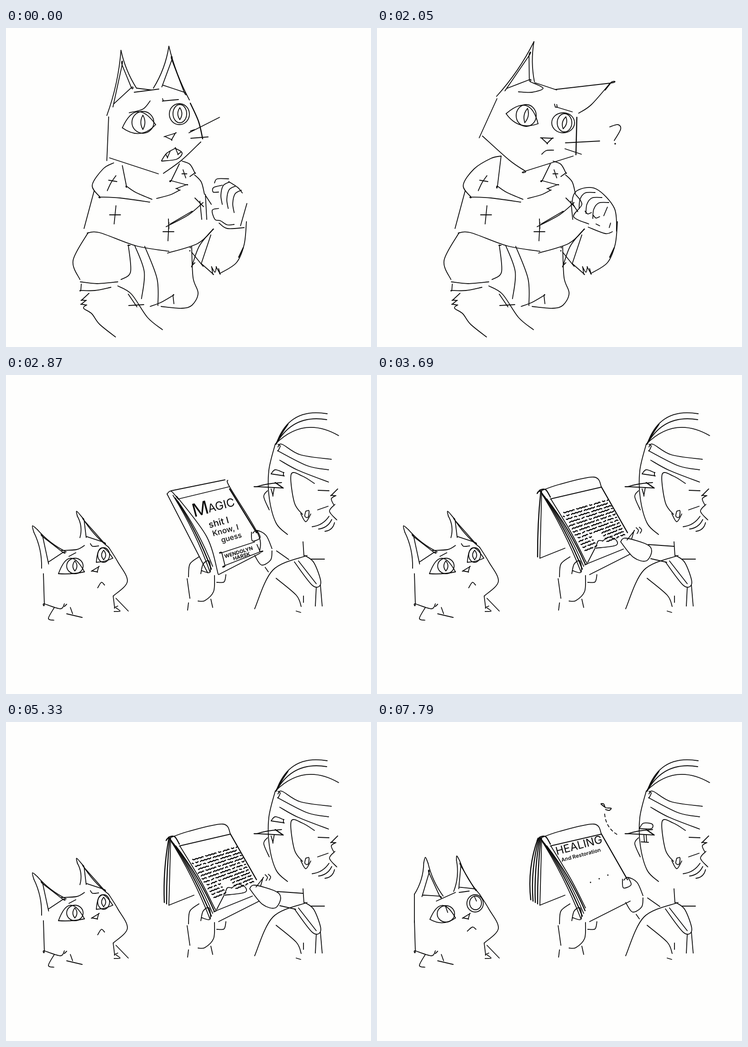
These frames come from a looping animation (800 by 700 pixels, 8000 ms). An HTML page with a canvas:

```html
<!DOCTYPE html>
<html lang="en">
<head>
<meta charset="utf-8">
<title>Cat and book</title>
<style>
html, body { margin: 0; width: 100%; height: 100%; overflow: hidden; background: #fefefd; }
canvas { display: block; width: 100%; height: 100%; }
</style>
</head>
<body>
<canvas id="stage" width="800" height="700"></canvas>
<script>
const LOOP = 8000, STEP = 410, PEN = 1.8, THICK = 2.4;
const c = document.getElementById('stage').getContext('2d');

// ---- Pen helpers ----

// Smooth curve through "x,y" points; "!" marks a sharp corner.
function trace(line) {
  const p = [];
  for (const s of line.trim().split(/\s+/)) {
    const q = s.replace('!', '').split(',').map(Number);
    p.push(q);
    if (s.endsWith('!')) p.push(q);
  }
  c.moveTo(...p[0]);
  for (let i = 0; i + 1 < p.length; i++) {
    const a = p[i], b = p[i + 1], o = p[i - 1] || a, n = p[i + 2] || b;
    c.bezierCurveTo(a[0] + (b[0] - o[0]) / 6, a[1] + (b[1] - o[1]) / 6,
      b[0] - (n[0] - a[0]) / 6, b[1] - (n[1] - a[1]) / 6, b[0], b[1]);
  }
}

function ink(lines, width = PEN, dx = 0, dy = 0) {
  c.save();
  c.translate(dx, dy);
  c.lineWidth = width;
  c.beginPath();
  lines.split('|').forEach(trace);
  c.stroke();
  c.restore();
}

// The same stroke several times, each shifted by (dx, dy).
function row(line, count, dx, dy, width) {
  for (let i = 0; i < count; i++) ink(line, width, i * dx, i * dy);
}

// Arc between two points whose middle is pushed sideways by bulge.
function bow(x1, y1, x2, y2, bulge, width = PEN) {
  const k = 2 * bulge / Math.hypot(x2 - x1, y2 - y1);
  c.lineWidth = width;
  c.beginPath();
  c.moveTo(x1, y1);
  c.quadraticCurveTo((x1 + x2) / 2 - (y2 - y1) * k, (y1 + y2) / 2 + (x2 - x1) * k, x2, y2);
  c.stroke();
}

function oval(x, y, rx, ry) {
  c.lineWidth = PEN;
  c.beginPath();
  c.ellipse(x, y, rx, ry, 0, 0, 7);
  c.stroke();
}

function dot(x, y, r = 1.4) {
  c.beginPath();
  c.arc(x, y, r, 0, 7);
  c.fill();
}

function cross(x, y, lean, size) {
  ink(`${x + lean},${y - size} ${x - lean},${y + size}|${x - size * .6},${y} ${x + size * .6},${y}`);
}

function write(text, x, y, size, weight = 400, angle = -15) {
  c.save();
  c.translate(x, y);
  c.rotate(angle * Math.PI / 180);
  c.font = `${weight} ${size}px Inter, sans-serif`;
  c.fillText(text, 0, 0);
  c.restore();
}

// ---- Cat parts ----

// Outer ear from base over the tip, plus a shrunken inner triangle moved by (dx, dy).
function ear(base, tip, end, dx = 0, dy = 0, round = 0) {
  const mid = i => (base[i] + tip[i] + end[i]) / 3;
  const inner = p => [mid(0) + (p[0] - mid(0)) * .6 + dx, mid(1) + (p[1] - mid(1)) * .6 + dy];
  const near = (p, f) => [tip[0] + (p[0] - tip[0]) * f, tip[1] + (p[1] - tip[1]) * f];
  const [l, r] = [near(base, round), near(end, round)];
  bow(...base, ...l, 5);
  bow(...r, ...end, 4);
  if (round) ink(`${l} ${tip} ${r}`);
  ink(`${inner(base)}! ${inner(tip)}! ${inner(end)}! ${inner(base)}`);
}

function almond(x1, y1, x2, y2, up, down) {
  bow(x1, y1, x2, y2, -up);
  bow(x1, y1, x2, y2, down);
}

function iris(x, y, rx, ry, lean = 0) {
  oval(x, y, rx, ry);
  const tall = ry * .65;
  for (const side of [-1, 1]) bow(x + lean, y - tall, x - lean, y + tall, side * 4.5);
}

// ---- Close-up ----

function clothes(tilted) {
  ink(`${tilted ? '272,281 250,286' : '236,296'} 213,309 189,345 206,371! 250,373 315,382`);
  ink(`${tilted ? '272,281' : '255,302'} 264,347! 285,361 320,376|330,374 360,366 380,356! 374,352! 395,344! 362,335! 380,298`);
  ink('386,292 403,299 414,318! 403,326|193,358 171,440');
  ink('413,322 428,338 435,365|178,450 205,449 285,478 357,490|354,494 420,473 455,441');
  if (!tilted) ink('437,365 440,420|437,367 450,387');
  ink('241,324 230,340 222,357|225,334 243,337');
  cross(391, 320, -3, 9);
  cross(239, 410, 2, 20);
  cross(356, 447, 1, 20);
  ink('356,419 357,440|351,436 400,410 432,383|360,430 408,402|414,373 433,392|425,380 429,420');
}

function body() {
  ink('180,449 147,510 162,552|268,476 273,535 252,552|163,557 200,561 245,557|165,562 164,576! 195,576 230,569');
  ink('182,582 166,597! 175,598! 165,606! 176,608! 170,615 188,627 205,650 240,678|245,566 275,584 310,635 343,662');
  ink('269,609 302,607|268,584 287,612|272,477 267,477|282,477 303,535 297,594|304,479 331,550 333,609');
  ink('316,611 340,602 366,587! 368,605|340,611 385,615 408,608 421,582 410,548 407,480');
  ink('454,441 424,478 408,521! 414,515|449,454 428,517|407,492 432,523');
  ink('428,517 453,539! 451,525! 458,536 461,525! 469,539! 466,528|468,539 505,515 522,475 527,425');
  ink('510,503 520,482', THICK);
  dot(404, 482);
  dot(403, 489);
}

function openHand(dx, dy) {
  row('490,338 476,346 471,367 474,387', 3, 13, 9);
  ink('457,340 463,331 488,331|466,360 454,360 455,350 474,345|488,337 508,350 518,362', PEN, dx, dy);
  ink('466,396 452,400 458,420 470,423 485,432 500,431|528,385 514,434|467,428 485,440 522,438', PEN, dx, dy);
}

function fist(dx, dy) {
  row('443,396 445,376 456,362 478,361', 3, 15, 11);
  row('470,405 462,408 456,402', 2, 18, 9);
  ink('440,403 428,380 440,356 480,353 520,395 525,446|436,366 449,387 431,414 464,430', PEN, dx, dy);
  ink('505,393 497,412|463,437 500,451 516,447|480,430 488,434|509,438 512,428', PEN, dx, dy);
}

const wideMouth = '341,291 352,275 371,264! 386,274 374,288 341,292|350,277 354,284! 360,270|372,265 377,277! 384,272';

function headUp() {
  ear([221, 192], [252, 49], [286, 132], 2, 2);
  ear([323, 132], [357, 40], [402, 158], 5, 2);
  ink('281,141 335,134|286,132 318,136|225,195 221,291|227,285 334,320|345,319 385,290 427,250');
  ink('401,230 468,196|405,242 443,239|404,226 413,223|270,186 300,178 316,160|343,155 345,160! 378,157');
  ink('404,165 422,205 431,243', THICK);
  almond(255, 219, 328, 212, 32, 16);
  iris(300, 207, 24, 24);
  oval(380, 189, 22, 23);
  iris(381, 188, 15, 20);
  ink('348,238! 371,231! 363,245! 348,238');
}

function headTilt() {
  ear([262, 150], [344, 30], [345, 118], 0, 3);
  ink('310,140 340,141 364,132 336,118|346,120 394,136|390,135 511,121! 470,168 442,187');
  ink('263,155 224,241|231,237 290,290 325,314! 430,281|389,167 391,174|394,168 395,174! 428,184');
  ink('413,252 488,248|412,265 448,277|360,241! 384,242! 373,253! 360,241');
  ink('438,196 436,278|511,122 500,136', THICK);
  almond(283, 188, 353, 210, 30, 14);
  iris(327, 192, 22, 24, 3);
  oval(408, 208, 25, 22);
  iris(411, 208, 16, 20, 3);
}

function closeUp(step) {
  const tilted = step > 2;
  clothes(tilted);
  body();
  if (tilted) {
    headTilt();
    fist(step === 4 ? -3 : 0, 0);
    if (step === 3) ink(wideMouth, PEN, 5, 4);
    if (step === 4) ink('353,282 365,271 385,270 380,281 353,282');
    if (step === 5) ink('361,277 371,269 387,268');
    if (step > 3) {
      ink('510,217 528,212 534,222 520,247');
      dot(522, 254, 1.8);
    }
  } else {
    headUp();
    openHand([0, -6, 10][step], 0);
    ink(step === 1 ? '350,286 373,276 382,278' : wideMouth);
  }
}

// ---- Streaked wipe ----

// Tapered brush band: starts at x around y, ends on the right between top and bottom.
function band(x, y, thick, top, bottom, reach, tone) {
  const w = 800 - x, g = c.createLinearGradient(x, 0, x + reach, 0);
  g.addColorStop(0, 'rgba(244,234,230,0)');
  g.addColorStop(.3, `rgba(${tone + 75},${tone + 66},${tone + 62},.7)`);
  g.addColorStop(1, `rgb(${tone},${tone - 1},${tone - 2})`);
  c.fillStyle = g;
  c.beginPath();
  c.moveTo(x, y - thick / 2);
  c.bezierCurveTo(x + w * .25, y - thick / 2, x + w * .4, top, 800, top);
  c.lineTo(800, bottom);
  c.bezierCurveTo(x + w * .4, bottom, x + w * .25, y + thick / 2, x, y + thick / 2);
  c.fill();
}

function wipe() {
  band(430, 20, 44, 0, 38, 370, 200);
  band(500, 91, 58, 66, 113, 700, 225);
  band(470, 173, 46, 146, 194, 350, 203);
  band(480, 348, 88, 303, 382, 400, 208);
  band(470, 520, 44, 492, 540, 360, 168);
  band(245, 61, 18, 36, 66, 470, 155);
  band(245, 143, 27, 113, 146, 510, 160);
  band(200, 265, 58, 222, 296, 460, 143);
  band(130, 230, 17, 192, 222, 400, 134);
  band(130, 315, 27, 289, 303, 470, 134);
  band(325, 452, 102, 386, 492, 415, 133);
  band(195, 403, 2, 382, 400, 480, 133);
  band(230, 499, 11, 484, 492, 450, 133);
  band(280, 571, 54, 540, 592, 440, 142);
  band(205, 662, 76, 590, 700, 190, 132);
  band(125, 613, 20, 592, 620, 290, 132);
}

// ---- Reading scene ----

function paws() {
  ink('82,436 84,502! 119,513 128,502|128,508 133,503|106,510 93,534 105,538|141,510 146,524|133,524 167,532');
  ink('235,486 238,510! 245,507|241,490 268,518|237,519 250,518 241,511');
  ink('188,430! 203,421! 200,432! 188,430|225,378 245,410 266,453 235,485');
}

function cat(mood) {
  paws();
  const alert = mood === 'alert';
  if (alert) {
    ear([82, 378], [106, 297], [145, 382], 6, 12, .15);
    ear([168, 372], [175, 294], [225, 378], 3, 0, .12);
    ink('82,440 82,378|130,393 172,374|180,374 202,371|198,459 209,450 217,455');
    almond(116, 433, 172, 430, 29, 9);
    oval(151, 421, 19, 18);
    oval(215, 398, 18, 19);
    oval(216, 397, 13, 15);
    ink('150,404 155,418|214,384 218,393');
    return;
  }
  const bored = mood === 'bored';
  ear([162, 357], [155, 299], [225, 378], 6, 2, .18);
  if (bored) ear([82, 435], [26, 356], [118, 382], 12, 2, .15);
  else ear([78, 424], [58, 331], [132, 388], 10, 4, .15);
  ink('122,385 155,383 172,374|138,398 153,390|185,370 190,376 203,375|201,467 209,455 216,461');
  c.save();
  if (bored) {
    // Lowered lids hide the upper part of the eyes.
    ink('120,405 170,404|199,383 230,381');
    c.beginPath();
    c.rect(100, 404, 80, 50);
    c.rect(190, 382, 60, 50);
    c.clip();
  }
  almond(115, 436, 172, 432, 32, 2);
  almond(198, 411, 234, 402, 28, 2);
  iris(151, 419, 18, 17);
  iris(214, 395, 13, 16);
  c.restore();
}

function reader(surprised) {
  bow(592, 152, 704, 85, -28);
  bow(592, 152, 703, 98, -22);
  bow(590, 152, 729, 133, -27);
  ink('596,158 605,152 645,175 713,185|595,166 660,199 707,208|600,187 640,209 707,235|596,152 601,156 596,167');
  ink('684,253 708,254|683,296 706,288|727,250 713,264! 722,265! 713,272 719,286|721,284 709,299 725,318');
  for (let i = 0; i < 3; i++) bow(671 + i * 14, 333 + i * 5, 708 + i * 6, 310 + i * 7, 5);
  ink('590,152 576,210 577,270 592,325 617,350|573,254 565,267 577,296|650,306 632,280 625,218 650,222 676,238');
  ink('646,304 657,322 668,305|657,299 655,310 662,312 664,298 657,299|608,248 549,245! 575,239 604,236');
  ink('651,366 653,397|660,396 585,428 545,513|592,446 636,483 647,508|652,485 652,499|636,518 646,521');
  ink('632,410 672,462 690,456 675,412 655,396|641,408 680,458|668,404 698,404|680,466 678,507|689,460 693,507');
  ink('591,152 606,126 618,108|590,236 606,247', THICK);
  if (surprised) ink('575,234 584,222 603,224 601,234 575,234|585,248 586,263|579,263 595,264|590,247 591,262');
  else ink('581,217 590,208 608,214! 608,221! 581,217|581,250 585,264! 588,247');
  ink('423,399 403,415 400,443|427,436 432,415 445,408 447,433 428,429|457,440 455,475 436,495 421,496');
  ink('397,447 403,490|400,500 398,516|449,492 453,510|482,438 478,454 462,455');
}

function gripHand() {
  ink('541,347 550,341 570,352 583,381|538,345 540,364 557,357 550,341');
  ink('545,396 560,417 580,406 583,386|593,386 620,405|568,422 575,432');
}

function pointHand() {
  ink('534,366 545,358 590,371 602,386 590,408 562,400 534,366|595,372 651,376|600,403 635,411|548,362 563,343! 558,360');
  row('568,335 573,341 570,348', 2, 7, -1);
}

function flipHand() {
  ink('437,166 422,166 440,145 482,140 486,146|468,158 450,164 434,183 472,179 490,192 511,177', THICK);
  ink('490,144 557,171|503,193 549,245|549,346 563,390! 466,438');
  ink('337,247 354,196 372,195 385,270|355,193 440,167|466,178 487,243|338,246 378,232');
  ink('305,200 313,180|328,223 336,180 367,161|498,240 502,226|505,243 509,227');
}

// Page edges seen between the spine and the front page.
function edges(count, x, y) {
  for (let i = 0; i < count; i++)
    bow(x + i * 5, y + i * 6, 447 + i * 3, 432 - i * 6, -5, i % 2 ? THICK : PEN);
}

function cover() {
  ink('362,254 480,230|378,272 490,245|486,231 491,247 552,348 556,388|353,261 362,255 378,273|466,438 557,391');
  ink('353,261 442,434|374,266 440,355 465,437');
  ink('490,250 549,346', THICK);
  edges(3, 366, 264);
  write('M', 412, 312, 40);
  write('AGIC', 445, 302, 25);
  write('shit I', 446, 336, 20, 500);
  write('Know, I', 454, 354, 17, 500);
  write('guess', 473, 368, 16, 500);
  ink('540,368! 473,390! 480,418! 557,388! 550,372');
  write('WENDOLYN', 480, 402, 11, 700, -17);
  write('HARSK', 499, 407, 11, 700, -17);
}

function openBook(leaves, flipping) {
  ink('380,272 492,246|357,402 412,380|466,438 555,393|381,272 425,345 457,408');
  ink('492,246 549,346|351,260 358,252 370,252 380,268', THICK);
  edges(4, 357, 254);
  for (let i = 0; i < leaves; i++)
    bow(361 - i * 2, 255, 357 - i * 5, 402 - i * 3, i * 2, i ? THICK : PEN);
  if (flipping) flipHand();
  else ink('352,257 400,240 475,224 492,246');
}

// Rows of scribbled handwriting on the slanted page.
function scribble() {
  c.lineWidth = 2.4;
  c.beginPath();
  for (let n = 0; n < 13; n++) {
    const x0 = 404 + n * 4.3, y0 = 304 + n * 6.8, x1 = 507 + n * 3, y1 = 274 + n * 6.3;
    let gap = true;
    for (let k = 0; k <= 40; k++) {
      const f = k / 40;
      const y = y0 + (y1 - y0) * f + Math.sin(k * 2.3 + n * 5);
      const blank = Math.sin(k * 1.7 + n * 4.1) > .93 || (n > 8 && f > .3 && f < .55);
      c[gap || blank ? 'moveTo' : 'lineTo'](x0 + (x1 - x0) * f, y);
      gap = blank;
    }
  }
  c.stroke();
}

function storyPage(title) {
  if (title) write('KABOOM', 391, 297, 25.5, 400, -17);
  scribble();
  ink('480,377 485,364 495,364! 508,356 524,362 523,374 480,380|457,408 461,414! 540,382|462,411 478,380');
}

function healingPage() {
  write('HEALING', 394, 292, 24);
  write('And Restoration', 405, 307, 11.5, 600);
  for (let i = 0; i < 3; i++) dot(468 + i * 19, 352 - i * 8);
}

function fly(x, y) {
  ink('0,0 -10,-8 -4,-8 0,0 12,1 8,6 0,4', 2, x, y);
}

function reading(step) {
  cat(step < 14 ? 'worried' : step < 18 ? 'bored' : 'alert');
  reader(step === 19);
  if (step === 7) {
    cover();
    gripHand();
  } else if (step < 16) {
    const flipping = step % 2 === 0;
    openBook(step < 12 ? 2 : 3, flipping);
    storyPage(step === 11);
    if (!flipping) pointHand();
  } else {
    openBook(step === 16 ? 4 : 5, step === 16);
    healingPage();
    if (step > 16) gripHand();
    const rise = Math.max(0, step - 17) / 2;
    fly(501 + 54 * Math.sin(rise * Math.PI) * .5, 295 - 107 * rise);
    if (rise === 1) {
      c.setLineDash([6, 6]);
      bow(499, 202, 528, 248, 7);
      c.setLineDash([]);
    }
  }
}

function draw(now) {
  const step = Math.floor(now % LOOP / STEP);
  c.fillStyle = '#fefefd';
  c.fillRect(0, 0, 800, 700);
  c.fillStyle = c.strokeStyle = '#0b0b0b';
  c.lineCap = c.lineJoin = 'round';
  if (step < 6) closeUp(step);
  else if (step === 6) wipe();
  else reading(step);
}

const start = performance.now();
function tick() {
  draw(performance.now() - start);
  requestAnimationFrame(tick);
}
tick();
</script>
</body>
</html>
```
